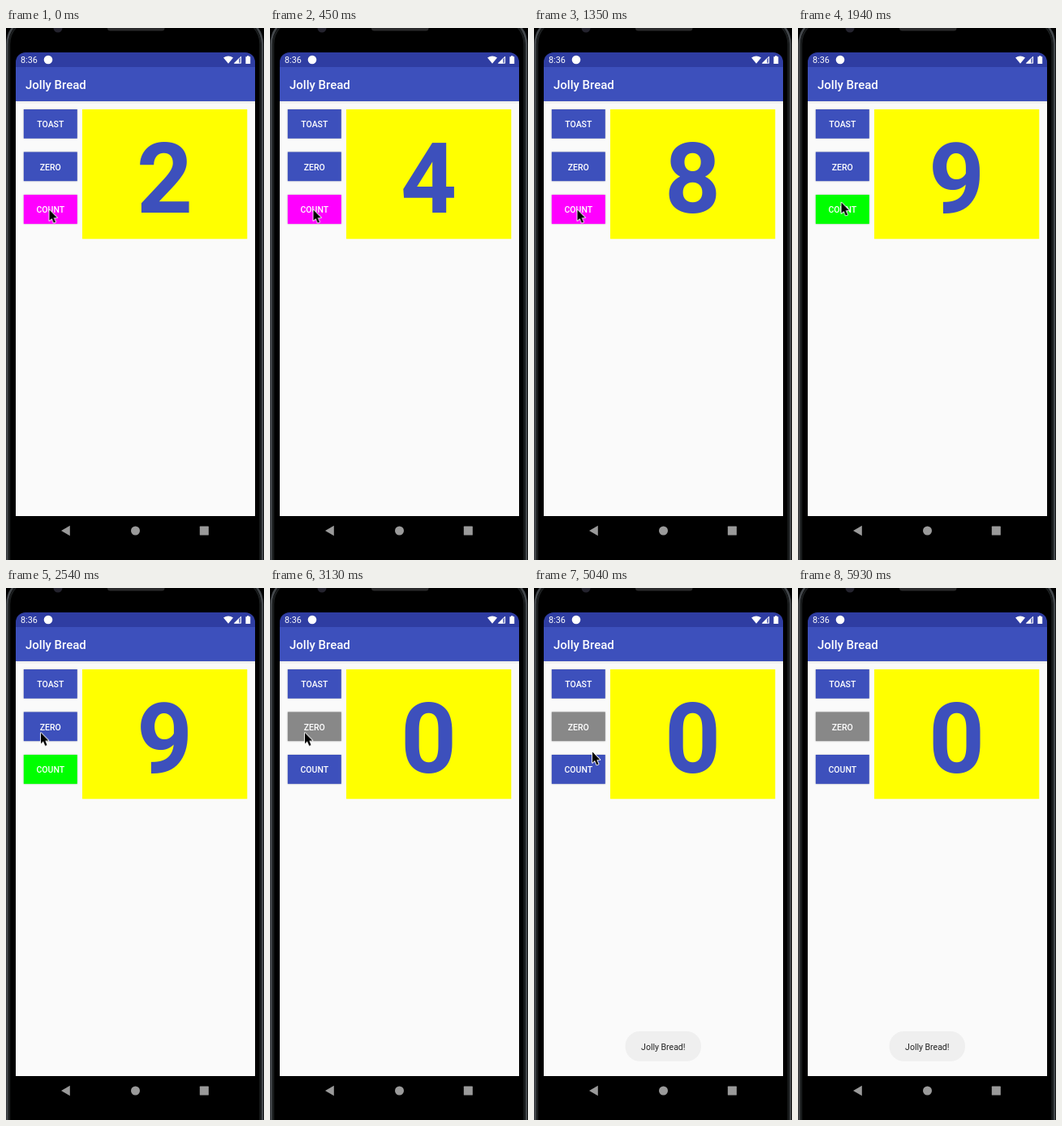
Write an HTML page that moves like this. It is 318x654 px and loops after 6.38 s.

```html
<!DOCTYPE html>
<html lang="en">
<head>
<meta charset="utf-8">
<title>Counter app</title>
<style>
  html, body { margin: 0; width: 100%; height: 100%; overflow: hidden; background: #000; }
  svg { display: block; }
  body > svg { width: 100vw; height: 100vh; }
  text { font-family: Roboto, sans-serif; font-size: 10.5px; fill: #fff; }
  .clock { font-size: 10.8px; }
  .title { font-size: 15px; font-weight: 500; }
  .label { font-weight: 500; text-anchor: middle; }
  .digits text { font-size: 120.5px; font-weight: 700; text-anchor: middle; fill: #3d50bc; }
  .button { fill: #3d50bc; filter: drop-shadow(0 .6px .9px rgba(0, 0, 0, .22)); }
  .toast text { fill: #222; text-anchor: middle; }

  .digits, .count, .zero, .toast, .cursor { animation: 6380ms step-end infinite; }
  .digits { animation-name: digits; }
  .count { animation-name: count; }
  .zero { animation-name: zero; }
  .toast { animation-name: toast; }
  .cursor { animation-name: cursor; }

  /* Each digit occupies one 160px row of the strip. */
  @keyframes digits {
    0% { transform: translateY(0); }
    4.7% { transform: translateY(-160px); }
    7.05% { transform: translateY(-320px); }
    11.75% { transform: translateY(-480px); }
    14.1% { transform: translateY(-640px); }
    18.8% { transform: translateY(-800px); }
    21.15% { transform: translateY(-960px); }
    23.51% { transform: translateY(-1120px); }
    46.7%, 100% { transform: translateY(-1280px); }
  }
  @keyframes count {
    0%, 7.05%, 14.1%, 21.15% { fill: #f0f; }
    4.7%, 11.75%, 18.8%, 23.51% { fill: #0f0; }
    46.7%, 100% { fill: #3d50bc; }
  }
  @keyframes zero {
    0% { fill: #3d50bc; }
    46.7%, 100% { fill: #888; }
  }
  @keyframes toast {
    0% { opacity: 0; }
    67.55% { opacity: .2; }
    69.9% { opacity: .5; }
    72.09% { opacity: .8; }
    74.45%, 100% { opacity: 1; }
  }
  @keyframes cursor {
    0% { transform: translate(52.5px, 222px); }
    30.4% { transform: translate(52.5px, 213px); }
    32.75% { transform: translate(43.5px, 178px); }
    39.81% { transform: translate(42px, 176.5px); }
    55.95% { transform: translate(42.5px, 169px); }
    58.3% { transform: translate(44px, 147px); }
    60.65% { transform: translate(45.5px, 124px); }
    63% { transform: translate(46.5px, 113.5px); }
    78.99% { transform: translate(71px, 200px); }
    81.34% { transform: translate(193px, 411px); }
    83.69% { transform: translate(250px, 543px); }
    86.04% { transform: translate(285px, 618px); }
    88.4% { transform: translate(299px, 651.5px); }
    92.94%, 100% { transform: translate(330px, 700px); }
  }
</style>
</head>
<body>
<svg viewBox="0 0 318 654">
  <!-- phone body -->
  <rect width="318" height="654"/>
  <g fill="none">
    <rect x="1.5" y="-14" width="314.5" height="720" rx="34" stroke="#44484c" stroke-width="2.6"/>
    <rect x="4.2" y="-11" width="309.2" height="714" rx="31" stroke="#1b1e1f" stroke-width="2"/>
  </g>
  <circle cx="64" cy="0" r="5.5" fill="#24232e"/>
  <rect x="125" y="-6" width="70.5" height="9.5" rx="3.5" fill="#2b2b2c"/>

  <!-- screen -->
  <path d="M12 600V90H307V600Z" fill="#fafafa"/>
  <path d="M12 90H307V91H12Z" fill="#000" opacity=".07"/>
  <path d="M12 91H307V93H12Z" fill="#000" opacity=".03"/>
  <path d="M12 48V42a12 12 0 0 1 12-12H295a12 12 0 0 1 12 12V48Z" fill="#2f3da2"/>
  <rect x="12" y="48" width="295" height="42" fill="#3d50bc"/>

  <!-- status bar -->
  <text class="clock" x="18" y="43">8:36</text>
  <g fill="#fff">
    <circle cx="52" cy="39" r="5.3"/>
    <path d="M274 43.8L268 36.6Q274 32.2 280 36.6Z"/>
    <path d="M281 43.5L290 34.5V43.5Z" opacity=".35"/>
    <path d="M281 43.5L287 37.5V43.5Z"/>
    <path d="M281.6 43.2L289.6 35.2V43.2Z" fill="none" stroke="#fff" stroke-width=".9"/>
    <path d="M297 34.2H299.6V35.2H301.2V44H295.4V35.2H297Z"/>
  </g>
  <text class="title" x="24" y="75">Jolly Bread</text>

  <!-- counter -->
  <rect x="94" y="100" width="203.3" height="159.3" fill="#ff0"/>
  <svg x="94" y="100" width="203" height="159" overflow="hidden">
    <g class="digits">
      <text x="101.6" y="126.7">2</text>
      <text x="101.6" y="286.7">3</text>
      <text x="101.6" y="446.7">4</text>
      <text x="101.6" y="606.7">5</text>
      <text x="101.6" y="766.7">6</text>
      <text x="101.6" y="926.7">7</text>
      <text x="101.6" y="1086.7">8</text>
      <text x="101.6" y="1246.7">9</text>
      <text x="101.6" y="1406.7">0</text>
    </g>
  </svg>

  <!-- buttons -->
  <rect class="button" x="21.8" y="100" width="66" height="35.8"/>
  <rect class="button zero" x="21.8" y="152.4" width="66" height="35.8"/>
  <rect class="button count" x="21.8" y="205" width="66" height="35.8"/>
  <text class="label" x="54.8" y="122">TOAST</text>
  <text class="label" x="54.8" y="174.5">ZERO</text>
  <text class="label" x="54.8" y="227">COUNT</text>

  <g class="toast">
    <rect x="112.5" y="545" width="93.5" height="36.8" rx="18" fill="#efefef"/>
    <text x="159.3" y="568">Jolly Bread!</text>
  </g>

  <!-- navigation -->
  <g fill="#9a9a9a">
    <path d="M68 618L78.8 611.8V624.2Z"/>
    <circle cx="159.5" cy="618" r="5.5"/>
    <rect x="238.8" y="612.6" width="11" height="11" rx=".6"/>
  </g>

  <g class="cursor">
    <path d="M1 1.6V14.8L4 12L6.3 17.4L8.6 16.4L6.3 11.2H10.4Z"
      stroke="#fff" stroke-width="1.7" paint-order="stroke" stroke-linejoin="round"/>
  </g>
</svg>
</body>
</html>
```
